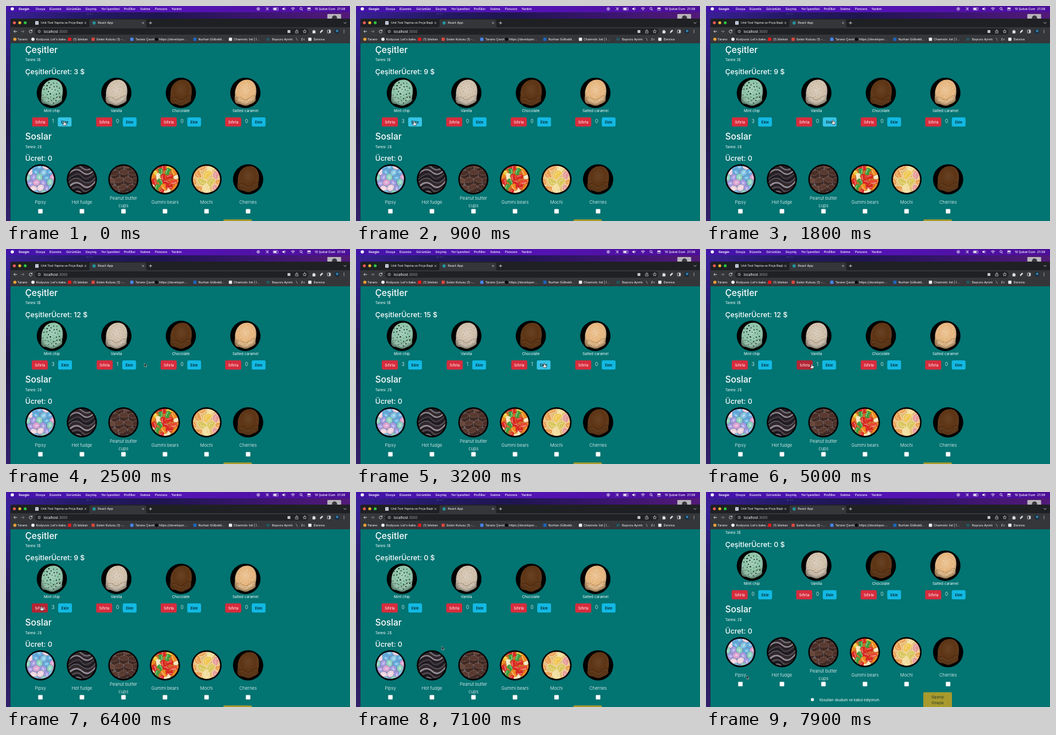
Recreate the animation shown at these times as an HTML page. Size 600 by 375 pixels, loop 8 s.

```html
<!DOCTYPE html>
<html lang="tr">
<head>
<meta charset="utf-8">
<title>React App</title>
<style>
html, body { margin: 0; width: 100%; height: 100%; overflow: hidden; background: #202124 }
svg { display: block; width: 100%; height: 100%; font-family: Inter, Roboto, "Liberation Sans", sans-serif }
text { white-space: pre }
.mid { text-anchor: middle }
</style>
</head>
<body>
<svg id="stage" viewBox="0 0 600 375" preserveAspectRatio="none">
<defs>
  <linearGradient id="menu"><stop stop-color="#4314a8"/><stop offset=".5" stop-color="#5413b4"/><stop offset="1" stop-color="#4c0f98"/></linearGradient>
  <linearGradient id="desk"><stop stop-color="#3a1f96"/><stop offset=".22" stop-color="#241a66"/><stop offset=".45" stop-color="#1f1550"/><stop offset=".75" stop-color="#3c1570"/><stop offset="1" stop-color="#531a78"/></linearGradient>
  <linearGradient id="side" x2="0" y2="1"><stop stop-color="#37209a"/><stop offset=".5" stop-color="#1d1748"/><stop offset="1" stop-color="#33206c"/></linearGradient>
  <radialGradient id="shade" cx=".5" cy=".38" r=".62"><stop stop-color="#fff" stop-opacity=".22"/><stop offset=".55" stop-color="#fff" stop-opacity="0"/><stop offset="1" stop-color="#000" stop-opacity=".38"/></radialGradient>
  <clipPath id="view"><rect x="7.5" y="65" width="592.5" height="310"/></clipPath>
  <clipPath id="dish"><circle r="23.6"/></clipPath>
  <path id="scoop" d="M-18 4C-19-10-11-23 3-23C14-23 20-13 19-2C19 4 17 8 18 13C16 18 9 19 4 22C-3 24-7 19-14 19C-20 17-19 10-18 4Z"/>
</defs>
<g id="frame"></g>
<g clip-path="url(#view)">
  <rect x="7.5" y="65" width="592.5" height="310" fill="#027472"/>
  <g id="page"></g>
</g>
<g id="hand"><path d="M-.9.3Q0-.9.9.3V2.6L3.4 3.3Q4.3 3.7 4 4.8L3.3 7.4H-1L-2.8 4.7Q-2.7 3.6-.9 4.4Z" fill="#fff" stroke="#111" stroke-width=".7"/><path d="M1 4.6V6.2M2.3 4.7V6.2" stroke="#333" stroke-width=".4"/></g>
<path id="arrow" d="M0 0V6.3L1.5 5 2.5 7.3 3.6 6.8 2.6 4.6H4.5Z" fill="#111" stroke="#ddd" stroke-width=".55"/>
</svg>
<script>
const $ = id => document.getElementById(id);
let seed = 7;
const rnd = () => (seed = seed * 16807 % 2147483647) / 2147483647;

const text = (x, y, size, str, attrs = '') =>
  `<text x="${x}" y="${y}" font-size="${size}" fill="#fff" ${attrs}>${str}</text>`;
const mid = (x, y, size, str, attrs = '') => text(x, y, size, str, 'class="mid" ' + attrs);
const rect = (x, y, w, h, fill, r = 0, attrs = '') =>
  `<rect x="${x}" y="${y}" width="${w}" height="${h}" rx="${r}" fill="${fill}" ${attrs}/>`;
const dot = (x, y, r, fill, attrs = '') => `<circle cx="${x}" cy="${y}" r="${r}" fill="${fill}" ${attrs}/>`;
const line = (d, color = '#d5d6d8', w = .9) =>
  `<path d="${d}" fill="none" stroke="${color}" stroke-width="${w}" stroke-linecap="round"/>`;
const at = (x, y, body) => `<g transform="translate(${x} ${y})">${body}</g>`;

function menuBar() {
  const items = [[22, 'Gezgin'], [52, 'Dosya'], [75.5, 'Düzenle'], [105, 'Görüntüle'], [138.5, 'Geçmiş'],
    [166, 'Yer İşaretleri'], [205.5, 'Profiller'], [234, 'Sekme'], [260, 'Pencere'], [288.5, 'Yardım'],
    [538.5, '10 Şubat Cum'], [577.5, '21:08']];
  return rect(0, 0, 600, 375, 'url(#desk)') + rect(0, 22, 8, 353, 'url(#side)') +
    rect(0, 0, 600, 11, 'url(#menu)') + dot(11, 5, 2.8, '#fff') +
    items.map(([x, s], i) => text(x, 7.1, 5.45, s, `font-weight="${i ? 500 : 700}"`)).join('') +
    dot(440, 5, 2.4, 'none', 'stroke="#fff" stroke-width=".8"') + dot(440, 5, 1, '#fff') +
    line('M453.5 2.5L457 7.3V2.5L453.5 7.3', '#fff', .7) +
    rect(466, 3, 8.5, 4.2, 'none', 1, 'stroke="#fff" stroke-width=".6"') + rect(466.8, 3.8, 5, 2.6, '#fff', .5) +
    `<path d="M482 4h1.5l2-1.8v5.6l-2-1.8H482z" fill="#fff"/>` + line('M487 3.5q1.2 1.5 0 3', '#fff', .6) +
    line('M497.5 4q3-2.6 6 0M498.8 5.5q1.7-1.4 3.4 0', '#fff', .9) + dot(500.5, 7, .7, '#fff') +
    dot(514.5, 4.5, 1.9, 'none', 'stroke="#fff" stroke-width=".8"') + line('M516 6L517.4 7.5', '#fff', .8) +
    rect(525.5, 2.7, 6, 2, '#fff', 1) + rect(525.5, 5.5, 6, 2, 'none', 1, 'stroke="#fff" stroke-width=".6"') +
    rect(560.5, 14, 24, 9, '#b9b5bd', 1) + dot(573, 21, 4.5, '#3a373e') +
    line('M141 14h3M147 14h1M150 14h1', '#6b62a8', .7);
}

function browser() {
  const cross = (x, y) => line(`M${x - 1.4} ${y - 1.4}l2.8 2.8m0-2.8l-2.8 2.8`, '#d5d6d8', .7);
  const marks = [[15.5, 20, 'Tarano', '#e9a23b'], [47, 52.5, "Kodyuva: Let's bake…", '#fff'],
    [111, 117, '(1) İzlekan', '#f01818'], [152, 157.5, 'Gelen Kutusu (1) -…', '#d9493d'],
    [219.5, 225.5, 'Tarano Çeviri', '#4587ee'], [262.5, 267, 'https://developer.…', '#08090a'],
    [329.5, 335.5, 'Nurhan Gölbekli…', '#1b67bd'], [391.5, 397, 'Channels: list | İ…', '#f1f1f1'],
    [457, 464, 'Başvuru Ayrıntı', '#235764'], [-9, 514.5, 'Z&lt;', '#235764'], [530, 536.5, 'Dersiva', '#eef0f4']];
  const round = [0, 1, 5, 8];
  return `<path d="M7.5 375V25.5Q7.5 22 11 22H600V375Z" fill="#1f2023"/>` +
    rect(7.5, 37, 592.5, 28, '#35363a') +
    `<path d="M143 37Q145.5 37 145.5 34.5V26Q145.5 23.5 148 23.5H242Q244.5 23.5 244.5 26V34.5Q244.5 37 247 37Z" fill="#35363a"/>` +
    dot(14.6, 29.2, 2.5, '#fb5d55') + dot(24, 29.2, 2.5, '#fbbc2f') + dot(33.5, 29.2, 2.5, '#2ac840') +
    rect(51, 26.6, 5.8, 5.8, '#e8eaf2', .5) + line('M52.3 28.5h3M52.3 30.3h3', '#5570a8', .7) +
    text(61, 31.4, 5.15, 'Unit Test Yapma ve Proje Başlı') + cross(138.5, 29.5) +
    dot(153.7, 29.6, 2.8, '#24939c') + text(160.3, 31.4, 5.45, 'React App') + cross(239, 29.5) +
    line('M249.8 29.5h4.6m-2.3-2.3v4.6') + line('M589.3 28.6l2 2 2-2') +
    line('M18.8 44.4h-5m2-2.1l-2.1 2.1 2.1 2.1') +
    line('M26.5 44.4h5m-2-2.1l2.1 2.1-2.1 2.1', '#85878a') +
    line('M45 42.8a2.6 2.6 0 1 0 .6 2M45.4 41.5v1.8h-1.9') +
    rect(50.5, 39, 477, 11, '#202124', 5.5) +
    dot(58, 44.4, 2.2, 'none', 'stroke="#c5c6c8" stroke-width=".7"') + line('M58 44.2v1.2M58 43v.1', '#c5c6c8', .7) +
    text(65.8, 46.5, 5.85, 'localhost<tspan fill="#9a9da1">:3000</tspan>') +
    rect(491, 42, 5, 5, '#bfc1c4', .6) +
    line('M505.6 43.6h-.8v3.6h4.6v-3.6h-.8M507.1 45.5v-4m-1.3 1.2l1.3-1.3 1.3 1.3', '#d5d6d8', .7) +
    line('M521 41.3l.9 2 2.2.2-1.7 1.5.5 2.1-1.9-1.1-1.9 1.1.5-2.1-1.7-1.5 2.2-.2z', '#d5d6d8', .7) +
    `<path d="M534.6 42.7h1.5q.9-2.2 1.8 0h1.6v1.7q2 .8 0 1.7v1.7h-4.9z" fill="#dfe0e2"/>` +
    `<path d="M548 47.5l-.2-2.7 3.5-3.5 1.8 1.8-3.5 3.5z" fill="#dfe0e2"/>` +
    rect(560.6, 41.8, 5.4, 5.2, 'none', .7, 'stroke="#dfe0e2" stroke-width=".8"') + rect(563.4, 42, 2.4, 4.8, '#dfe0e2') +
    dot(577.3, 44.3, 4, '#172b3d') + dot(577.6, 43.5, 2.3, '#347fa6') +
    [42.2, 44.4, 46.6].map(y => dot(589.5, y, .65, '#dfe0e2')).join('') +
    marks.map(([ix, x, s, color], i) =>
      (round.includes(i) ? dot(ix, 58, 2.8, color) : rect(ix - 2.8, 55.3, 5.6, 5.4, color, .6)) +
      text(x, 60, i == 8 ? 5.05 : 5.4, s)).join('') +
    line('M506 55.8l2.4 4.5', '#aaa', .8);
}

// Ice cream on a black plate
function scoop(x, y, color, { specks = '', count = 0, size = [.6, .5], flat = false } = {}) {
  let dots = '';
  for (let i = 0; i < count; i++) {
    const a = i * 2.4, d = Math.sqrt((i + .5) / count) * 18;
    dots += dot(Math.cos(a) * d * .93, Math.sin(a) * d * 1.08 - 1, size[0] + rnd() * size[1], specks);
  }
  return at(x, y, dot(0, 0, 26.4, '#010101') +
    `<use href="#scoop" fill="${color}"/>` +
    `<use href="#scoop" fill="url(#shade)" opacity="${flat ? .3 : 1}"/>` + dots +
    line('M-17 9Q-10 5-5 10T7 9T17 6', flat ? '#49290f' : '#4b35204d', 1.1) +
    line('M-15 15Q-10 11-5 16T5 15T15 12', flat ? '#4b2b10' : '#ffffff55', 1));
}

// Candy heap: a staggered grid of pieces in a round dish
function heap(x, back, colors, step, piece) {
  let body = rect(-26, -26, 52, 52, back);
  for (let row = 0, y = -22; y < 27; y += step * .82, row++)
    for (let px = -24 + row % 2 * step / 2; px < 28; px += step) {
      const turn = rnd() * 360, color = colors[Math.floor(rnd() * colors.length)];
      body += `<g transform="translate(${px + rnd() * 3 - 1.5} ${y + rnd() * 2 - 1}) rotate(${turn})">${piece(color, turn)}</g>`;
    }
  return dish(x, body);
}
const dish = (x, body) => at(x, 302.3, dot(0, 0, 26.4, '#040404') + `<g clip-path="url(#dish)">${body}</g>`);
const ell = (rx, ry, fill, attrs = '') => `<ellipse rx="${rx}" ry="${ry}" fill="${fill}" ${attrs}/>`;

function fudge() {
  let body = rect(-26, -26, 52, 52, '#2c272d');
  const tones = ['#51484f', '#171519', '#777079', '#3e2a27', '#958e98', '#231d20'];
  for (let i = 0; i < 17; i++) {
    const y = -30 + i * 3.8;
    body += line(`M-26 ${y + 9}Q${-14 + rnd() * 8} ${y - 9} 0 ${y + 2}T26 ${y - 7}`, tones[i % 6], 1 + rnd() * 2);
  }
  return dish(132.3, body);
}

const egg = c => ell(6.6, 5.6, c, 'stroke="#51668b" stroke-opacity=".5" stroke-width=".6"') + ell(2.8, 1.7, '#fff', 'opacity=".4"');
const cup = (c, turn) => `<g transform="rotate(${-turn + turn % 50 - 25})">` +
  `<path d="M-8-3L-6 6Q0 9 6 6L8-3Z" fill="#38231e"/>` + line('M-5 1l1 5M-1.5 2v5M2 2v5M5 1l-1 5', '#5c4239', .7) +
  `<g transform="translate(0 -3)">${ell(8, 4.3, c, 'stroke="#8d6a5c" stroke-width=".6"')}</g></g>`;
const bear = c => rect(-6.5, -3.3, 13, 6.6, c, 3.2) + dot(-4, 3, 1.8, c) + dot(3.5, 3, 1.9, c) +
  line('M-4-1.2Q0-2.4 4-1', '#fff9', 1);
const jelly = c => `<path d="M-9 3A9 9 0 0 1 9 3Q8 5.5 5 5.5H-5Q-8 5.5-9 3Z" fill="${c}" stroke="#fff4d8" stroke-opacity=".7" stroke-width=".9"/>` +
  line('M-5 1Q0-5 5 1', '#ffffff59', 1.4);

const cols = [80, 192.5, 305, 417.5];
const flavours = ['Mint chip', 'Vanilla', 'Chocolate', 'Salted caramel'];
const toppings = ['Pipsy', 'Hot fudge', 'Peanut butter|cups', 'Gummi bears', 'Mochi', 'Cherries'];
const box = (x, y, s) => rect(x - s / 2, y - s / 2, s, s, '#fff', 1, 'stroke="#c9d2d2" stroke-width=".4"');

function page() {
  return text(33.5, 82.3, 15.4, 'Çeşitler', 'font-weight="500"') +
    text(33.5, 96.4, 5.85, 'Tanesi 3$') +
    text(33.5, 118.7, 12.35, '', 'font-weight="500" id="price"') +
    scoop(cols[0], 151.5, '#8dc4a8', { specks: '#17251f', count: 34, size: [.45, .8] }) +
    scoop(cols[1], 151.5, '#d1c1ac', { specks: '#96806a66', count: 40 }) +
    scoop(cols[2], 151.5, '#5d3515', { flat: true }) +
    scoop(cols[3], 151.5, '#e5b47b', { specks: '#fff0cf66', count: 40 }) +
    cols.map((x, i) => mid(x, 185.3, 6.4, flavours[i]) +
      `<g id="reset${i}">${rect(x - 35, 194.3, 28, 16, '#dc3545', 2.4)}${mid(x - 21, 204.7, 6.6, 'Sıfırla')}</g>` +
      mid(x + 2, 204.2, 8.4, '', `font-weight="300" id="count${i}"`) +
      `<g id="add${i}">${rect(x + 11, 194.3, 24, 16, '#0dcaf0', 2.4)}${mid(x + 23, 204.7, 6.5, 'Ekle', 'style="fill:#000"')}</g>`).join('') +
    text(33.5, 233.3, 15.4, 'Soslar', 'font-weight="500"') +
    text(33.5, 247.8, 5.85, 'Tanesi: 2$') +
    text(33.5, 269.7, 12.35, 'Ücret: 0', 'font-weight="500"') +
    heap(60, '#8295c4', ['#83c5e5', '#dca3d2', '#8ed4c1', '#a49be0', '#efd3df', '#64aede'], 11.5, egg) +
    fudge() +
    heap(204.7, '#655c63', ['#583a30', '#68473b', '#4b3029'], 16, cup) +
    heap(277.2, '#cf702c', ['#d92722', '#3e9c3c', '#ef8c20', '#efcb3b', '#e84832', '#f2e5bd'], 11, bear) +
    heap(349.7, '#e5bd78', ['#efc650', '#e9a052', '#e69b98', '#f1dd9b', '#d9c65c'], 16, jelly) +
    scoop(422.3, 302.3, '#5d3515', { flat: true }) +
    toppings.map((s, i) => {
      const x = 60 + i * 72.45, rows = s.split('|');
      return rows.map((r, k) => mid(x, (rows[1] ? 338.3 : 344.6) + k * 12.2, 7.7, r, 'font-weight="300"')).join('') +
        box(x, 358, 7.6);
    }).join('') +
    box(185.6, 385.2, 4.8) + text(198, 387.5, 6.1, 'Kosulları okudum ve kabul ediyorum') +
    rect(379, 372.3, 50, 27, '#a89a2d', 2.4) +
    mid(404, 382.5, 6.4, 'Siparişi', 'style="fill:#25372f"') + mid(404, 392.5, 6.4, 'Onayla', 'style="fill:#25372f"');
}

$('frame').innerHTML = menuBar() + browser();
$('page').innerHTML = page();

// [time, flavour, new count]
const clicks = [[0, 0, 1], [400, 0, 2], [900, 0, 3], [2200, 1, 1], [3100, 2, 1], [4300, 2, 0], [5400, 1, 0], [6500, 0, 0]];
// [time, x, y] of the pointer tip
const path = [[0, 101.5, 201], [1000, 101.5, 201], [1600, 221.5, 199], [2350, 221.5, 199], [2900, 328.5, 199.5],
  [3500, 328.5, 199.5], [4000, 285, 201], [4400, 285, 201], [4900, 184.3, 201], [5500, 184.3, 201],
  [6100, 62, 199.5], [6650, 62, 199.5], [7050, 149.7, 269], [7200, 149.7, 269], [7800, 70.7, 320], [8000, 70.7, 320]];
const ease = u => (u = Math.min(1, Math.max(0, u)), u * u * (3 - 2 * u));

function pointer(t) {
  const i = path.findIndex(p => p[0] > t);
  const [t0, x0, y0] = path[i - 1], [t1, x1, y1] = path[i], u = ease((t - t0) / (t1 - t0));
  return [x0 + (x1 - x0) * u, y0 + (y1 - y0) * u];
}

function draw(now) {
  const t = now % 8000, [px, py] = pointer(t), counts = [0, 0, 0, 0];
  for (const [time, i, n] of clicks) if (t >= time) counts[i] = n;
  $('price').textContent = `ÇeşitlerÜcret: ${3 * counts.reduce((a, b) => a + b)} $`;
  const scroll = 23 * ease((t - 7300) / 400);
  $('page').setAttribute('transform', `translate(0 ${-scroll})`);

  let over = false;
  const button = (id, left, width, shift, color, hot) => {
    const hit = px >= left + shift && px <= left + shift + width && Math.abs(py + scroll - 202.3) < 8;
    $(id).setAttribute('transform', `translate(${shift} 0)`);
    $(id).firstChild.setAttribute('fill', hit ? hot : color);
    over ||= hit;
  };
  cols.forEach((x, i) => {
    const shift = counts[i] == 1 ? .7 : counts[i] == 0 ? -.2 : 0;
    $('count' + i).textContent = counts[i];
    button('reset' + i, x - 35, 28, shift, '#d72c3d', '#b52534');
    button('add' + i, x + 11, 24, -shift, '#12b9e3', '#36c4e6');
  });
  for (const [id, on] of [['hand', over], ['arrow', !over]]) {
    $(id).setAttribute('transform', `translate(${px} ${py})`);
    $(id).style.display = on ? '' : 'none';
  }
}

const start = performance.now();
(function loop() {
  draw(performance.now() - start);
  requestAnimationFrame(loop);
})();
</script>
</body>
</html>
```
